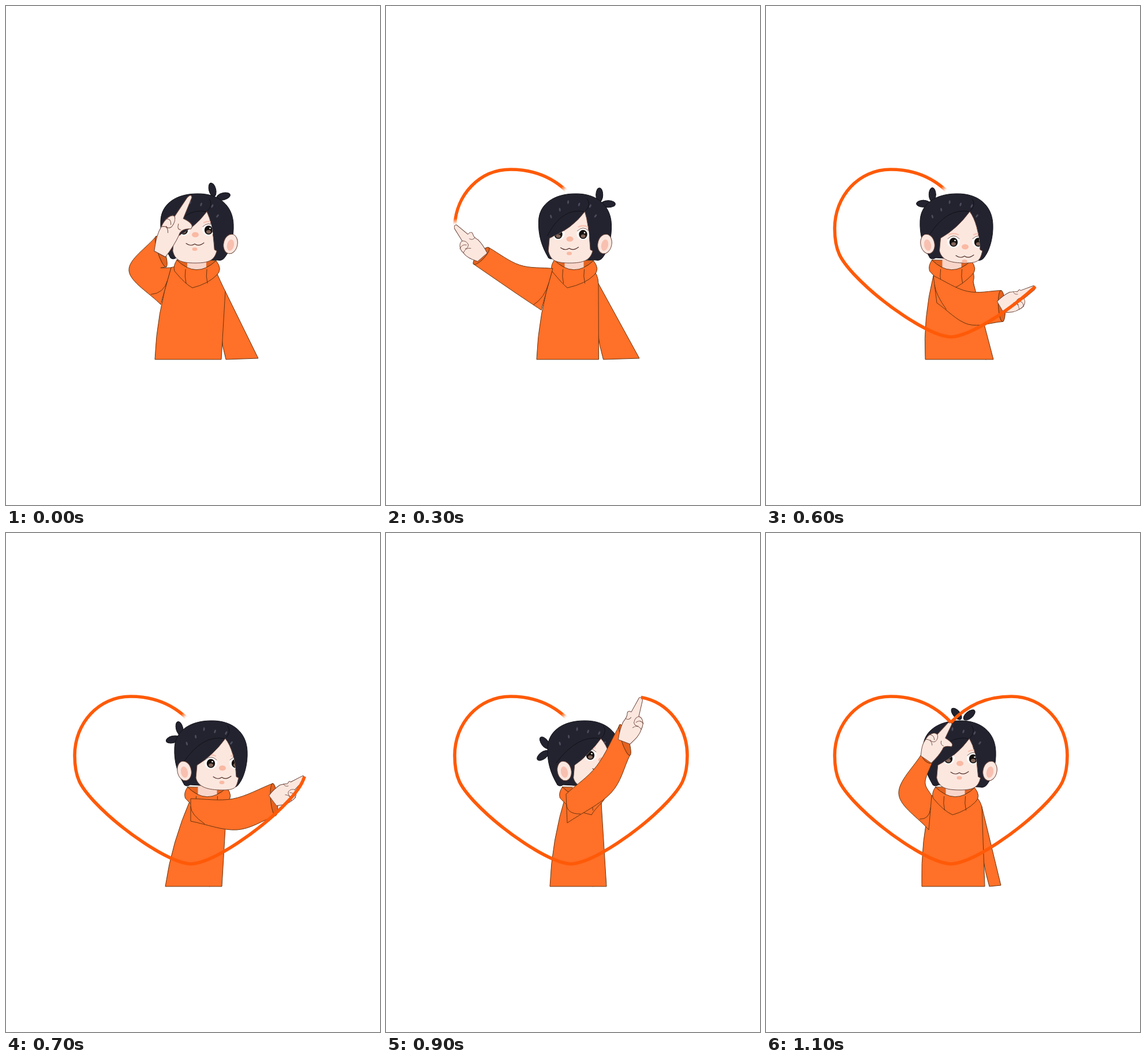
Animation, 648 px wide and 864 px high, one loop 1.2 s. Source, as an HTML page:

```html
<!DOCTYPE html>
<html lang="en">
<head>
<meta charset="utf-8">
<title>Drawing a heart</title>
<style>
html, body { margin: 0; width: 100%; height: 100%; overflow: hidden; background: #fff; }
svg { display: block; width: 100%; height: 100%; }
</style>
</head>
<body>
<svg viewBox="0 0 648 864">
  <defs>
    <radialGradient id="fade"><stop offset=".15"/><stop offset="1" stop-opacity="0"/></radialGradient>
    <mask id="ends" maskUnits="userSpaceOnUse" x="0" y="0" width="648" height="864">
      <rect width="648" height="864" fill="#fff"/>
      <circle id="startFade" fill="url(#fade)"/>
      <circle id="endFade" fill="url(#fade)"/>
    </mask>
  </defs>
  <g id="figure" stroke-linejoin="round" stroke-linecap="round"></g>
  <g mask="url(#ends)"><path id="trail" fill="none" stroke="#ff5a08" stroke-width="5.6" stroke-linejoin="round"/></g>
</svg>
<script>
const STEP = 100, STEPS = 12, HEM = 612, HEAD_Y = 384;
const CLOTH = '#ff7028', INSIDE = '#e4621f', SEAM = '#67340f';
const SKIN = '#fce7df', BLUSH = '#f9b9a3', LINE = '#6b463c';
const HAIR = '#23232f', STRAND = '#111118';

// look: nose from the head's middle; tuft: degrees from upright; ear: offset;
// hand: angle, length, thumb; cuff: angle, half width; reach: part of the heart drawn.
const poses = [
  { step: 0, head: 331, look: [-3, 12], tuft: 31, ear: 58, left: [286, 453], right: [380, 494], hem: [258, 373], far: 437,
    elbow: [213, 458], pit: [268, 517], hand: [-62, 110, 27], cuff: [-18, 28], side: -1, reach: 0 },
  { step: 2, head: 329, look: [-10, 8], tuft: 56, ear: 49, left: [288, 441], right: [362, 474], hem: [258, 371], far: 440,
    elbow: [208, 445], pit: [266, 513], hand: [-117, 78, 19], cuff: [-105, 11], side: -1, reach: .145 },
  { step: 4, head: 326, look: [-8, 31], tuft: 35, ear: 54, left: [290, 468], right: [374, 487], hem: [264, 366], far: 438,
    elbow: [240, 548], pit: [272, 540], hand: [-145, 62, 8], cuff: [-169, 28], side: -1, reach: .33 },
  { step: 6, head: 330, look: [15, 33], tuft: -45, ear: -50, left: [290, 467], right: [359, 478], hem: [276, 394], far: 388,
    elbow: [350, 551], pit: [296, 514], hand: [-390, 67, 8], cuff: [-363, 27], side: 1, reach: .652 },
  { step: 7, head: 355, look: [20, 23], tuft: -59, ear: -46, left: [320, 460], right: [383, 460], hem: [276, 374], far: 360,
    elbow: [400, 514], pit: [320, 499], hand: [-397, 66, 8], cuff: [-365, 28], side: 1, reach: .725 },
  { step: 9, head: 343, look: [31, 9], tuft: -82, ear: -34, left: [312, 452], right: [373, 468], hem: [284, 382], far: 366,
    elbow: [390, 450], pit: [314, 502], hand: [-429, 79, 12], cuff: [-378, 28], side: 1, reach: .881 },
  { step: 11, head: 335, look: [1, 15], tuft: 5, ear: 53, left: [287, 455], right: [374, 474], hem: [270, 379], far: 407,
    elbow: [230, 452], pit: [282, 514], hand: [-416, 74, 24], cuff: [-405, 12], side: -1, reach: 1 }
];

const mix = (a, b, t) => Array.isArray(a) ? a.map((v, i) => mix(v, b[i], t)) : a + (b - a) * t;
const shift = ([x, y], degrees, r) => {
  const a = degrees * Math.PI / 180;
  return [x + r * Math.cos(a), y + r * Math.sin(a)];
};

function poseAt(step) {
  const next = poses.findIndex(p => p.step >= step);
  const b = poses[next];
  if (b.step === step) return b;
  const a = poses[next - 1], t = (step - a.step) / (b.step - a.step), pose = {};
  for (const key in a) pose[key] = mix(a[key], b[key], t);
  pose.side = b.side;
  return pose;
}

const path = (d, fill, stroke = 'none', width = 1) =>
  `<path d="${d}" fill="${fill}" stroke="${stroke}" stroke-width="${width}"/>`;
const line = (d, color = SEAM, width = 1) => path(d, 'none', color, width);
const oval = (x, y, rx, ry, fill, turn = 0, stroke = 'none') =>
  `<ellipse rx="${rx}" ry="${ry}" fill="${fill}" stroke="${stroke}" transform="translate(${x} ${y}) rotate(${turn})"/>`;
const group = (transform, content) => `<g transform="${transform}">${content}</g>`;

// Smooth curve from a through b to c.
function through(a, b, c) {
  const lean = k => [b[0] + k * (c[0] - a[0]) / 6, b[1] + k * (c[1] - a[1]) / 6];
  return `L${a}C${mix(a, b, .33)} ${lean(-1)} ${b}C${lean(1)} ${mix(c, b, .33)} ${c}`;
}

function body({ left, right, hem, far, look }) {
  const cx = (left[0] + right[0]) / 2 - 3;
  const [x0, x1] = hem;
  const inner = Math.min(x1 + 8, far - 8);
  const waist = [(left[0] + x0) / 2 - 11, (left[1] + HEM) / 2];
  const sleeve = `M${right}L${far} ${HEM - 2}L${inner} ${HEM}Q${x1 - 6} 565 ${right[0] - 4} 505Z`;
  const torso = `M${left}Q${waist} ${x0} ${HEM}L${x1} ${HEM}L${right}Q${cx + 42} ${right[1] - 16} ${cx + 32} 455L${cx - 30} 450Z`;
  const opening = `M${cx - 34} 440Q${cx} 473 ${cx + 34} 441`;
  const dip = [cx + look[0] * .7 - 5, 488];
  const collar = `${opening}Q${cx + 46} 456 ${cx + 35} 466Q${cx + 20} 481 ${dip}Q${cx - 20} 481 ${cx - 38} 459Q${cx - 41} 450 ${cx - 34} 440Z`;
  const pleats = [-19, 18].map(x => line(`M${cx + x} 456q-2 12 1 24`)).join('');
  return path(sleeve, CLOTH, SEAM) + path(torso, CLOTH, SEAM)
    + path(opening + 'Z', INSIDE, SEAM)
    + path(`M${cx - 16} 425V454Q${cx} 460 ${cx + 17} 455V425Z`, '#f9d5c9')
    + path(collar, CLOTH, SEAM) + pleats;
}

function eye(x, y) {
  return oval(x, y - 1, 11, 10.5, '#fff')
    + line(`M${x - 10} ${y - 6}Q${x} ${y - 16} ${x + 10} ${y - 6}`, LINE, .9)
    + oval(x, y, 7.2, 7.8, '#15110f') + oval(x, y + 3, 4, 3, '#80645a')
    + oval(x + 2.5, y - 3, 1.3, 1.3, '#fff')
    + line(`M${x - 8} ${y - 13}q8 -4 16 0`, '#f8c4b4', 2.5);
}

function head({ head: x, look: [nx, ny], tuft, ear }) {
  const leaves = [-1, 1].map(k => {
    const [lx, ly] = shift([0, 0], tuft + 9 * k - 90, 71);
    return oval(lx, ly, 6, 12, HAIR, tuft + 45 * k, STRAND);
  }).join('');
  const hair = 'M-46 52C-58 32 -64 12 -63 -12C-62 -42 -35 -59 0 -59C38 -60 62 -38 63 -6C64 15 58 38 49 50Q44 58 36 56L-36 52Q-42 56 -46 52Z';
  const px = 17 + .4 * Math.max(0, nx), py = -28;
  const l = -40 + .7 * nx, r = 36 + .6 * nx;
  const face = `M${px} ${py}Q${r - 7} ${py + 20} ${r - 4} 38L${r} 40C${r - 4} 56 ${nx + 24} 61 ${nx} 61`
    + `C${nx - 26} 61 ${l + 4} 56 ${l} 40L${l + 2} 18Q${px - 22} 2 ${px} ${py}Z`;
  let shine = '';
  for (let i = 0; i < 6; i++) {
    const [sx, sy] = shift([0, 0], 205 + i * 25, 46 - 5 * (i % 2));
    shine += oval(sx, sy, 1.5, 3.2, '#4b4c5d', i * 10 - 15);
  }
  const strands = line(`M${px} ${py}Q${px - 40} ${py - 8} -48 14M${px} ${py}Q${px + 12} ${py - 12} ${px + 4} -50`, STRAND);
  const tilt = 12 * Math.sign(ear);
  const features = eye(nx - 20, ny - 8) + eye(nx + 23, ny - 8)
    + oval(nx, ny, 6, 4.5, BLUSH) + oval(nx - 1, ny + 25, 4.5, 3, BLUSH)
    + line(`M${nx - 16} ${ny + 15}q8 6 15 1q7 5 16 -2`, '#4a2a22', 1.1);
  return group(`translate(${x} ${HEAD_Y})`,
    leaves + path(hair, HAIR, STRAND) + strands + shine
    + oval(ear, 28, 12, 17, SKIN, tilt, LINE) + oval(ear, 30, 6, 10, '#f8c0b0', tilt)
    + `<clipPath id="skin"><path d="${face}"/></clipPath>`
    + path(face, SKIN, LINE) + `<g clip-path="url(#skin)">${features}</g>`);
}

function arm({ left, elbow, pit, hand, cuff, side }, tip) {
  const [angle, size, thumb] = hand, [turn, half] = cuff;
  const wrist = shift(tip, angle, -size);
  const outer = shift(wrist, turn + 90 * side, half), inner = shift(wrist, turn - 90 * side, half);
  const bend = mix(mix(left, inner, .5), elbow, .2);
  const sleeve = through(outer, elbow, pit).replace('L', 'M') + through(left, bend, inner) + 'Z';
  const crease = `M${mix(left, pit, .35)}Q${mix(left, pit, .7)} ${mix(pit, elbow, .3)}`;
  const palm = `M-94 -11C-82 -16 -72 -21 -58 -20C-46 -21 -36 -15 -37 -8L-5 -4Q3 -1 -2 3Q-18 5 -34 7`
    + `Q-33 ${thumb + 3} -42 ${thumb}Q-48 11 -58 14Q-74 15 -94 11Z`;
  const fingers = 'M-37 -8q-5 6 -15 4q-6 -4 -3 -9M-47 -20q6 8 -3 13M-59 -20q7 9 -3 15M-50 12q-2 -6 6 -8';
  return path(sleeve, CLOTH, SEAM) + line(crease)
    + oval(...wrist, 6, half, INSIDE, turn, SEAM)
    + group(`translate(${tip}) rotate(${angle}) scale(${size / 90} ${-side})`,
      path(palm, SKIN, LINE) + line(fingers, LINE, .9));
}

const [figure, trail, startFade, endFade] =
  ['figure', 'trail', 'startFade', 'endFade'].map(id => document.getElementById(id));

// Left half of the heart as cubic curves, then its mirror image.
const half = [[320.5, 328], [290, 295], [255, 283], [216, 283], [160, 283], [119, 330], [119, 385],
  [119, 425], [130, 440], [152, 464], [200, 515], [282, 571], [320.5, 573]];
const heart = [...half, ...half.slice(0, -1).reverse().map(([x, y]) => [641 - x, y])];
trail.setAttribute('d', `M${heart[0]}C${heart.slice(1).join(' ')}`);
const length = trail.getTotalLength();
const heartPoint = part => {
  const p = trail.getPointAtLength(part * length);
  return [p.x, p.y];
};

function placeFade(circle, part, r) {
  const [cx, cy] = heartPoint(part);
  for (const [name, value] of Object.entries({ cx, cy, r })) circle.setAttribute(name, value);
}

let shown = -1;
function update(time) {
  const step = Math.floor(time / STEP) % STEPS;
  if (step === shown) return;
  shown = step;
  const pose = poseAt(step), { reach } = pose;
  const from = reach < 1 ? .01 : 0;
  figure.innerHTML = body(pose) + head(pose) + arm(pose, heartPoint(reach));
  trail.style.display = reach ? '' : 'none';
  trail.setAttribute('stroke-dasharray', `${Math.max(0, reach - from) * length} ${length * 2}`);
  trail.setAttribute('stroke-dashoffset', -from * length);
  placeFade(startFade, from, reach < 1 ? 11 : 0);
  placeFade(endFade, reach, reach < .45 ? 12 : 0);
}

const start = performance.now();
function tick() {
  update(performance.now() - start);
  requestAnimationFrame(tick);
}
tick();
</script>
</body>
</html>
```
